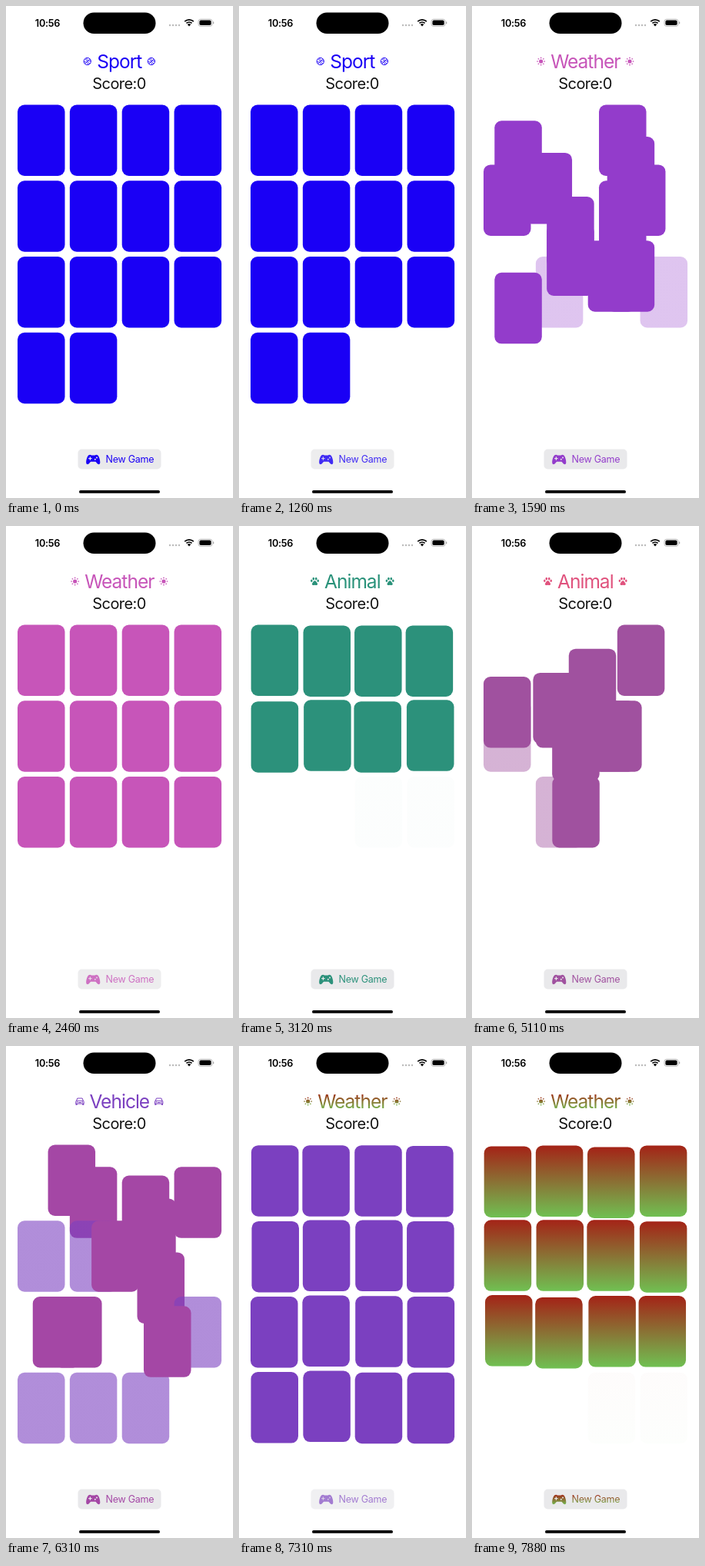
Animation, 295 px wide and 640 px high, one loop 7.99 s. Source, as an HTML page with a canvas:

```html
<!DOCTYPE html>
<html lang="en">
<head>
<meta charset="utf-8">
<style>
  html, body { margin: 0; width: 100%; height: 100%; overflow: hidden; background: #fff; }
  canvas { display: block; }
</style>
</head>
<body>
<canvas id="stage" width="295" height="640"></canvas>
<script>
const ctx = document.getElementById('stage').getContext('2d');
const LOOP = 7990, LAG = 42, TAU = Math.PI * 2;
const FONT = 'Inter, "Open Sans", sans-serif';
const BUTTON_FILL = '#e9e9eb';

const solid = (...rgb) => [rgb, rgb];

// from[i] is the previous slot of the card now in slot i; -1 is a new card.
// late lists the slots whose cards trail the rest.
const games = [
  { start: -5000, name: 'Sport', colors: solid(26, 0, 245), from: Array.from({ length: 14 }, (_, i) => i) },
  { start: 1335, name: 'Weather', colors: solid(199, 85, 185), from: [5, 12, 3, 8, 0, 10, 7, 1, 13, 2, 6, 4] },
  { start: 2535, name: 'Animal', colors: solid(42, 146, 122), from: [1, 6, 5, 4, 9, 3, 8, 2] },
  { start: 3720, name: 'Sport', colors: solid(77, 80, 202), from: [6, -1, 0, 3, -1, 7, 1, -1, 5, 2, -1, 4] },
  { start: 4904, name: 'Animal', colors: solid(224, 82, 125), from: [11, 7, 8, 2, 0, 1, 6, 5, 3, 10], late: [3, 7, 8] },
  { start: 6094, name: 'Vehicle', colors: solid(123, 64, 192),
    from: [2, 5, 6, 7, -1, -1, 4, 0, 9, 8, 3, -1, -1, -1, -1, 1], late: [2] },
  { start: 7300, name: 'Weather', colors: [[165, 35, 20], [112, 194, 80]], from: [9, 5, 13, 6, 1, 2, 0, 10, 3, 12, 7, 4] },
];

const mix = (a, b, p) => a + (b - a) * p;
const clamp = v => Math.max(0, Math.min(1, v));
const mixColors = (a, b, p) => a.map((rgb, i) => rgb.map((v, k) => mix(v, b[i][k], p)));

// Critically damped spring, response 0.55 s.
function spring(ms) {
  const x = Math.max(0, ms) * TAU / 550;
  return 1 - (1 + x) * Math.exp(-x);
}

function paint([top, bottom], y0, y1) {
  const g = ctx.createLinearGradient(0, y0, 0, y1);
  g.addColorStop(0, `rgb(${top})`);
  g.addColorStop(1, `rgb(${bottom})`);
  return g;
}

function box(x, y, w, h, r, fill) {
  ctx.beginPath();
  ctx.roundRect(x, y, w, h, r);
  ctx.fillStyle = fill;
  ctx.fill();
}

function dot(x, y, rx, ry = rx, fill = ctx.fillStyle) {
  ctx.beginPath();
  ctx.ellipse(x, y, rx, ry, 0, 0, TAU);
  ctx.fillStyle = fill;
  ctx.fill();
}

function text(str, x, y, size, spacing, fill, align = 'center', weight = 400) {
  ctx.font = `${weight} ${size}px ${FONT}`;
  ctx.letterSpacing = `${spacing * size}px`;
  ctx.textAlign = align;
  ctx.fillStyle = fill;
  ctx.fillText(str, x, y);
  return ctx.measureText(str).width;
}

function strokePath(d, width) {
  ctx.lineWidth = width;
  ctx.stroke(new Path2D(d));
}

// Each icon is drawn around the point 0,0.
const icons = {
  Sport() {
    ctx.beginPath();
    ctx.arc(0, 0, 4.6, 0, TAU);
    ctx.lineWidth = 1;
    ctx.stroke();
    strokePath('M-3.2 -3.2L3.2 3.2M-4.5 .5Q1 1 1.2 4.5M-1 -4.5Q-1 -.5 4.5 -.5M3.2 -3.2L-3.2 3.2', .8);
  },
  Weather() {
    dot(0, 0, 2.6);
    for (let i = 0; i < 8; i++) {
      const a = i * TAU / 8;
      dot(4.6 * Math.cos(a), 4.6 * Math.sin(a), .85);
    }
  },
  Animal() {
    for (const s of [-1, 1]) {
      dot(s * 1.7, -3.4, 1.3, 1.9);
      dot(s * 4.2, -.7, 1.2, 1.7);
    }
    ctx.fill(new Path2D('M0 -.7C1.9 -.7 2.2 1.4 3.3 2.5C4.3 4 3 5.5 1.4 4.9Q0 4.4 -1.4 4.9C-3 5.5 -4.3 4 -3.3 2.5C-2.2 1.4 -1.9 -.7 0 -.7Z'));
  },
  Vehicle() {
    strokePath('M-4.5 -.5L-3.2 -4H3.2L4.5 -.5M-5.2 .2Q-5.2 -.7 -4.3 -.7H4.3Q5.2 -.7 5.2 .2V3H-5.2ZM-2 1.5H2', 1);
    ctx.fillRect(-5.4, 3, 2.2, 1.8);
    ctx.fillRect(3.2, 3, 2.2, 1.8);
    dot(-3.4, 1.1, .8);
    dot(3.4, 1.1, .8);
  },
};

function drawStatusBar() {
  text('10:56', 54, 27, 12.7, -.02, '#000', 'center', 600);
  box(100.5, 8.5, 94, 27.5, 13.75, '#000');
  for (let i = 0; i < 4; i++) dot(213 + i * 4, 25, 1.2, 1.2, '#bbb');
  ctx.strokeStyle = '#000';
  ctx.lineWidth = 1.7;
  for (const r of [5, 8.2]) {
    ctx.beginPath();
    ctx.arc(238, 26, r, -TAU * .375, -TAU * .125);
    ctx.stroke();
  }
  ctx.fillStyle = '#000';
  ctx.fill(new Path2D('M238 26.5L235.8 24Q238 22 240.2 24Z'));
  ctx.strokeStyle = '#aaa';
  ctx.lineWidth = .8;
  ctx.beginPath();
  ctx.roundRect(250, 17.2, 18, 9.2, 3);
  ctx.stroke();
  box(251.4, 18.6, 15.2, 6.4, 1.8, '#000');
  box(269, 20.3, 1.2, 3, .6, '#aaa');
  box(95, 630, 105, 3.8, 1.9, '#000');
}

function drawTitle({ name, colors }) {
  const w = text(name, 147.3, 81, 24.5, -.04, paint(colors, 60, 84));
  for (const side of [-1, 1]) {
    ctx.save();
    ctx.translate(147.3 + side * (w / 2 + 12.5), 72);
    ctx.fillStyle = ctx.strokeStyle = paint(colors, -6, 6);
    icons[name]();
    ctx.restore();
  }
  text('Score:0', 147, 107.5, 20, -.03, '#111');
}

function drawCard(x, y, colors, alpha = 1) {
  ctx.globalAlpha = alpha;
  box(x, y, 61.5, 92.5, 9, paint(colors, y, y + 92.5));
  ctx.globalAlpha = 1;
}

const slot = i => [15 + 67.85 * (i % 4), 128.5 + 98.75 * Math.floor(i / 4)];

function drawCards(game, before, age, blended) {
  const slow = spring(age - LAG);
  if (before && slow < .995) {
    before.from.forEach((_, i) => {
      if (!game.from.includes(i)) drawCard(...slot(i), blended, 1 - slow);
    });
  }
  game.from.forEach((old, i) => {
    const end = slot(i);
    if (old < 0) return drawCard(...end, game.colors, slow);
    const p = game.late?.includes(i) ? slow : spring(age);
    const begin = slot(old);
    drawCard(mix(begin[0], end[0], p), mix(begin[1], end[1], p), blended);
  });
}

function drawButton(colors, alpha) {
  ctx.globalAlpha = alpha;
  box(93.5, 576.5, 108, 26, 5, BUTTON_FILL);
  const fill = paint(colors, 583, 597);
  ctx.fillStyle = fill;
  ctx.fill(new Path2D('M108 584Q110 583.5 111 584.5H115.5Q117 583.5 118.5 584C121 585 122.5 591 122.3 594C122 597 119.5 596.5 118 594.5L116.5 592.8H110L108.5 594.5C107 596.5 104.5 597 104.2 594C104 591 105.5 585 108 584Z'));
  ctx.fillStyle = BUTTON_FILL;
  ctx.fillRect(107.2, 588, 4.4, 1.2);
  ctx.fillRect(108.8, 586.4, 1.2, 4.4);
  dot(115.8, 589.8, 1);
  dot(118, 587.6, 1);
  text('New Game', 129.5, 594.3, 12.5, -.02, fill, 'left');
  ctx.globalAlpha = 1;
}

// Fades while held down, just before a new game starts.
function buttonAlpha(t) {
  const next = games.find(g => t < g.start + 170);
  if (!next) return 1;
  const d = t - next.start;
  return 1 - .36 * (d < 0 ? clamp(1 + d / 150) : clamp(1 - d / 170));
}

function draw(now) {
  const t = now % LOOP;
  const index = games.findLastIndex(g => t >= g.start);
  const game = games[index], before = games[index - 1];
  const age = t - game.start;
  const blended = before ? mixColors(before.colors, game.colors, spring(age - LAG)) : game.colors;

  ctx.fillStyle = '#fff';
  ctx.fillRect(0, 0, 295, 640);
  drawStatusBar();
  drawTitle(game);
  drawCards(game, before, age, blended);
  drawButton(blended, buttonAlpha(t));
}

const begin = performance.now();
function tick() {
  draw(performance.now() - begin);
  requestAnimationFrame(tick);
}
tick();
</script>
</body>
</html>
```
